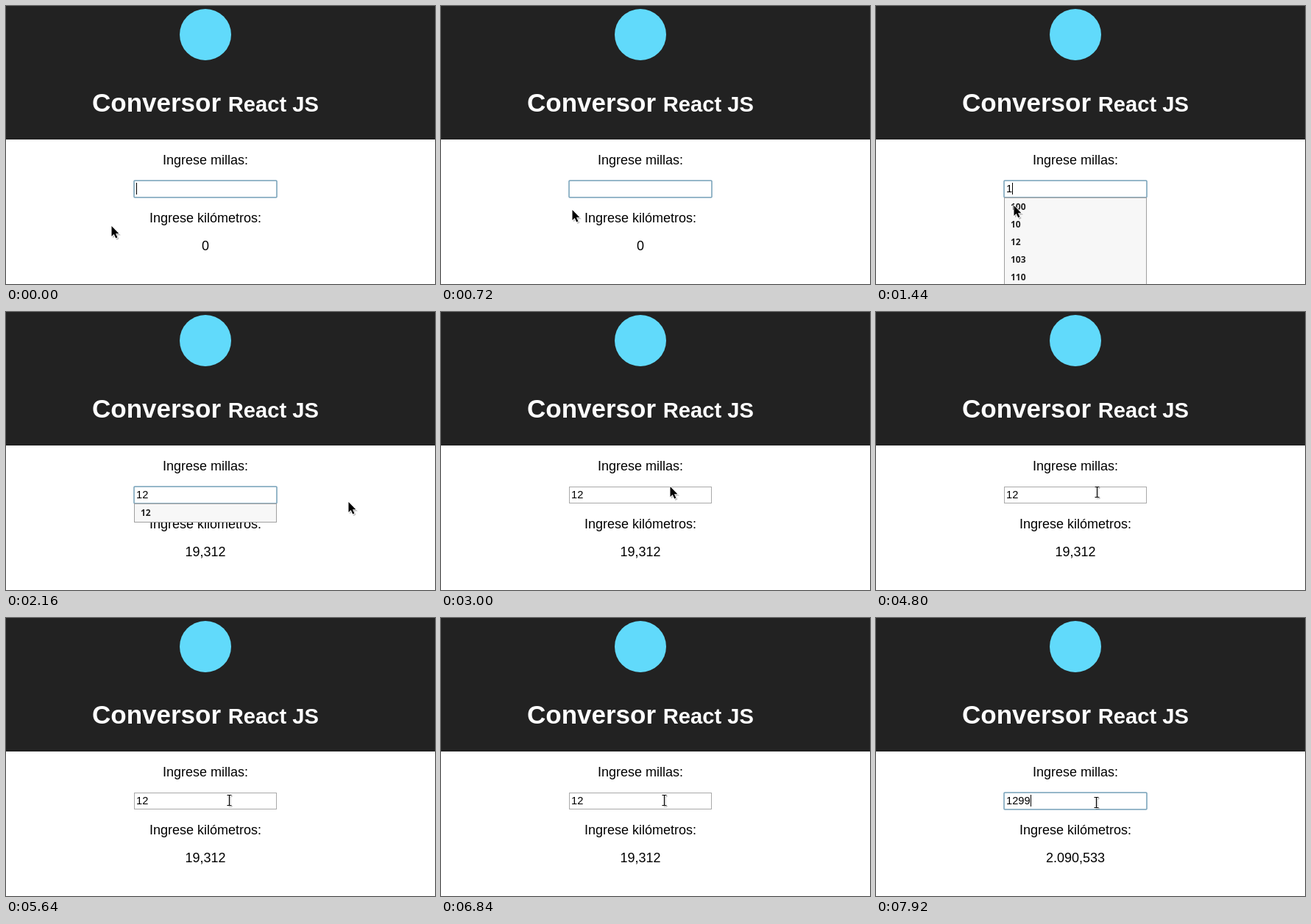
Animation, 583 px wide and 379 px high, one loop 8000 ms. Source, as an HTML page:

```html
<!DOCTYPE html>
<html lang="es">
<head>
<meta charset="utf-8">
<title>Conversor</title>
<style>
  html, body { margin: 0; width: 100%; height: 100%; overflow: hidden; background: #fff; }
  body { position: relative; font: 18px/1 "Liberation Sans", Arial, sans-serif; color: #000; }
  h1, p, div, svg { position: absolute; margin: 0; box-sizing: border-box; white-space: nowrap; }
  svg { left: 0; top: 0; width: 583px; height: 379px; }
  h1, p { left: 71px; width: 400px; text-align: center; }
  h1 { top: 114px; font-size: 35px; line-height: 1; color: #fff; }
  small { font-size: smaller; }
  #typed { left: 177px; top: 241px; font-size: 14.67px; line-height: 16px; }
  #caret { top: 241px; width: 1px; height: 16px; background: #000; }
  #menu { left: 174px; top: 261px; width: 194px; background: #f7f7f7; border: 1px solid #a0a0a0;
    padding-left: 8px; white-space: pre; color: #222;
    font: bold 12px/24px "Open Sans", "Noto Sans", sans-serif; }
</style>
</head>
<body>
<svg viewBox="0 0 583 379">
  <rect width="583" height="182" fill="#222"/>
  <circle cx="271" cy="39" r="35" fill="#61dafb"/>
  <rect id="blur" x="174.5" y="238.5" width="193" height="22" fill="#fff" stroke="#a9a9a9"/>
  <rect id="focus" x="174" y="238" width="194" height="23" rx="1" fill="#fff" stroke="#74a0b8" stroke-width="1.5"/>
</svg>

<h1>Conversor <small>React JS</small></h1>
<p style="top:201px">Ingrese millas:</p>
<p style="top:280px">Ingrese kilómetros:</p>
<p style="top:318px" id="result">0</p>
<div id="typed"></div>
<div id="caret"></div>
<div id="menu"></div>

<svg viewBox="0 0 583 379">
  <g id="arrow">
    <path d="M2 3V17.5L5 14.5L7.5 20L10.5 18.5L8.5 13.5H13Z" opacity=".25"/>
    <path d="M.5 1V15L3.7 12L6.2 17.6L8.4 16.6L6 11.2H10.4Z" stroke="#fff" stroke-width="1.6" paint-order="stroke"/>
  </g>
  <g id="beam" fill="none">
    <path d="M-1 -5.5H4M1 -5.5V8.5M-1 8.5H4" stroke="#000" stroke-width="2" opacity=".25"/>
    <path d="M-3 -7H3M0 -7V7M-3 7H3" stroke="#fff" stroke-width="2.4"/>
    <path d="M-3 -7H3M0 -7V7M-3 7H3" stroke="#000" stroke-width="1.2"/>
  </g>
</svg>
<script>
const LOOP = 8000, STEP = 120, KM = 1.60934;
const $ = id => document.getElementById(id);
const show = (id, on) => { $(id).style.visibility = on ? 'visible' : 'hidden'; };

// [time, x, y] of the pointer tip
const path = [
  [0, 143, 299], [240, 143, 299], [840, 187, 271], [1680, 187, 271],
  [2160, 465, 258], [2400, 465, 258], [2520, 425, 264], [2640, 330, 312],
  [2760, 230, 314], [2880, 176, 288], [3000, 311, 237], [3360, 300, 246],
  [3960, 300, 245], [5160, 300, 245], [5520, 303, 248],
  [6840, 303, 248], [7200, 299, 251], [8000, 299, 251]
];
// [time, field text]
const keys = [[0, ''], [1200, '1'], [1560, '12'], [7680, '129'], [7800, '1299']];
const history = ['100', '10', '12', '103', '110'];

const last = (list, t) => list.filter(e => e[0] <= t).pop();

function pointer(t) {
  const i = path.findIndex(p => p[0] > t);
  const [t0, x0, y0] = path[i - 1], [t1, x1, y1] = path[i];
  const k = (t - t0) / (t1 - t0);
  return [x0 + (x1 - x0) * k, y0 + (y1 - y0) * k].map(Math.round);
}

function format(n) {
  if (!n) return '0';
  const [whole, part] = n.toFixed(3).split('.');
  return whole.replace(/\B(?=(\d{3})+$)/g, '.') + ',' + part;
}

function draw(time) {
  const t = Math.floor(time / STEP) * STEP;
  const [since, text] = last(keys, t);
  const focused = t < 2280 || t >= 7200;
  const blinkFrom = t >= 7200 ? Math.max(since, 7200) : since;

  $('typed').textContent = text;
  $('result').textContent = format(text * KM);
  show('blur', !focused);
  show('focus', focused);
  show('caret', focused && (t - blinkFrom) % 1000 < 500);
  $('caret').style.left = Math.round(177 + text.length * 8.16) + 'px';

  show('menu', t >= 1200 && t < 2280);
  $('menu').textContent = history.filter(s => s.startsWith(text)).join('\n');

  const [x, y] = pointer(t);
  const inField = t > 3000 && y >= 238;
  show('arrow', !inField);
  show('beam', inField);
  $('arrow').setAttribute('transform', `translate(${x} ${y})`);
  $('beam').setAttribute('transform', `translate(${x + .5} ${y + .5})`);
}

function tick() {
  draw(performance.now() % LOOP);
  requestAnimationFrame(tick);
}
tick();
</script>
</body>
</html>
```
